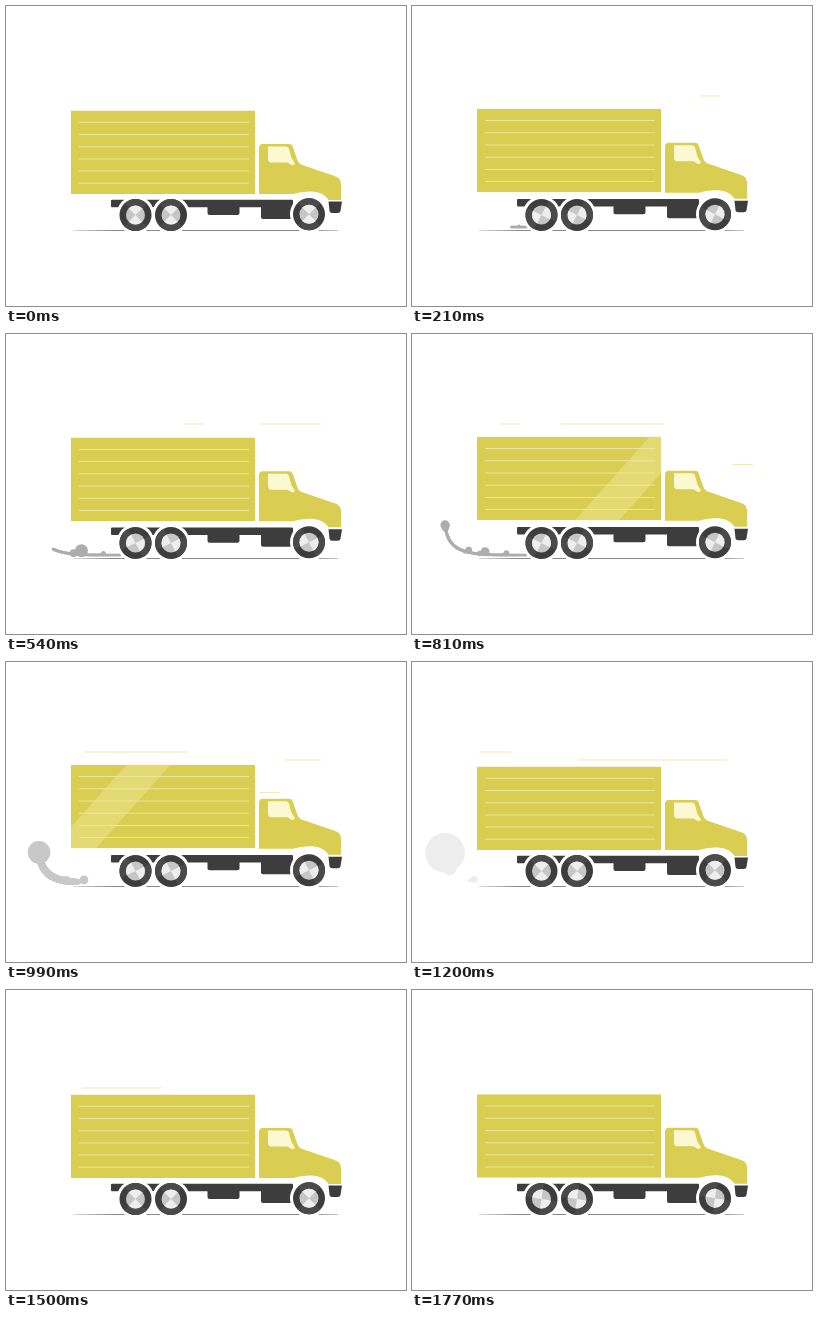
These frames come from a looping animation (400x300 px, 1800 ms). An HTML page with a canvas:

```html
<!DOCTYPE html>
<html lang="en">
<head>
<meta charset="utf-8">
<title>Truck</title>
<style>
  html, body { margin: 0; width: 100%; height: 100%; overflow: hidden; background: #fff; }
  canvas { display: block; width: 400px; height: 300px; }
</style>
</head>
<body>
<canvas id="stage"></canvas>
<script>
const LOOP = 1800, STEP = 30, BOUNCE = 300;
const YELLOW = '#d9cd52', PALE = '#ede69a', DARK = '#3d3d3d', SMOKE = '#adadad';
const canvas = document.getElementById('stage');
const scale = window.devicePixelRatio || 1;
canvas.width = 400 * scale;
canvas.height = 300 * scale;
const ctx = canvas.getContext('2d');

const cab = new Path2D('M253 188V142Q253 138 257 138H283Q286 138 286.5 140L291 153Q292 157 295 158.5L330 170.5Q335 172.5 335 178V194H322.5C319 188 312 185.5 303 185.5Q294 185.5 287 188Z');
const glass = new Path2D('M262 140.5H280Q282.5 140.5 283 143L285.5 152L289 157.5Q288 160 285.5 159L281.5 156.5H265Q262 156.5 262 152Z');
const bumper = new Path2D('M322.5 195.5H336L334.5 205Q334 207 332 207H326Q324 207 323.5 205Z');

const clamp = (v, lo = 0, hi = 1) => Math.min(hi, Math.max(lo, v));
const progress = (t, from, to) => clamp((t - from) / (to - from));

function fill(color, path) {
  ctx.fillStyle = color;
  ctx.fill(path);
}

function rect(color, x, y, w, h, r = 0) {
  const p = new Path2D();
  p.roundRect(x, y, w, h, r);
  fill(color, p);
}

function disc(color, x, y, r) {
  const p = new Path2D();
  p.arc(x, y, r, 0, Math.PI * 2);
  fill(color, p);
}

function hLine(x1, x2, y, color, width = 1) {
  if (x2 > x1) rect(color, x1, y - width / 2, x2 - x1, width);
}

function shifted(dy, paint) {
  ctx.save();
  ctx.translate(0, dy);
  paint();
  ctx.restore();
}

function streak(t, start, speed, length, y, left, right) {
  const x = right - (t - start) * speed;
  hLine(clamp(x, left, right), clamp(x + length, left, right), y, '#f0ebb4');
}

function streaks(t) {
  streak(t, 129, 0.333, 20, 90, 68, 315);
  streak(t, 385, 0.392, 104, 90, 68, 315);
  streak(t, 920, 0.532, 149, 98, 76, 315);
  streak(t, 740, 0.37, 21, 130.5, 249, 346);
}

// Smoke runs along the road and curls up: a cubic curve from exhaust to tip.
function trail(s) {
  const q = 1 - s;
  const bezier = (a, b, c, d) => a*q*q*q + 3*b*s*q*q + 3*c*s*s*q + d*s*s*s;
  return [bezier(114, 58, 36, 33), bezier(221, 221, 222, 190)];
}

function smoke(t) {
  const head = progress(t, 150, 810), tail = progress(t, 840, 1300);
  if (!head || tail === 1) return;
  const fade = 1 - progress(t, 840, 1200) * 0.78;
  const spread = 1 + tail * 4;
  ctx.save();
  ctx.beginPath();
  ctx.rect(0, 0, 400, 223);
  ctx.clip();
  const color = `rgb(${[0, 0, 0].map(() => Math.round(255 - 82 * fade))})`;
  for (let s = tail; s <= head; s += 0.01) {
    const [x, y] = trail(s);
    const flare = 3.5 * progress(s, 0.92, 1);
    disc(color, x, y, (1.6 + flare) * spread);
  }
  for (let i = 0; i < 3; i++) {
    const age = (t - 150 - i * 240) / 800;
    if (age <= 0 || age >= 1) continue;
    const [x, y] = trail(age * 0.56);
    const r = (i ? 4.5 : 6.5) * Math.sin(Math.PI * age);
    disc(color, x, y - r * 0.6, r);
    disc(color, x - r * 1.2, y - r * 0.2, r * 0.6);
  }
  ctx.restore();
}

function ground() {
  const g = ctx.createLinearGradient(66, 0, 333, 0);
  g.addColorStop(0, '#ddd');
  g.addColorStop(0.15, '#888');
  g.addColorStop(0.9, '#888');
  g.addColorStop(1, '#ccc');
  hLine(67, 332, 224.5, g);
}

function box(t) {
  ctx.beginPath();
  ctx.rect(65, 104.5, 184, 83.5);
  ctx.clip();
  rect(YELLOW, 65, 104.5, 184, 83.5);
  if (t > 660 && t < 1200) {
    const x = 163 - (t - 810) * 0.65;
    fill('#e4da74', new Path2D(`M${x} 188H${x + 44}L${x + 119} 104H${x + 75}Z`));
  }
  for (let i = 0; i < 6; i++) hLine(73, 243, 116.3 + i * 12.2, PALE);
}

function chassis() {
  rect(DARK, 105, 193.8, 182, 7.5, 1);
  rect(DARK, 201.5, 196, 32, 13, 2);
  rect(DARK, 255, 196, 32, 17, 2);
  fill(DARK, bumper);
}

function wedges(color, x, y, r, angle) {
  for (const turn of [0, Math.PI]) {
    const a = angle + turn - Math.PI / 2;
    const p = new Path2D();
    p.moveTo(x, y);
    p.arc(x, y, r, a - Math.PI / 4, a + Math.PI / 4);
    p.closePath();
    fill(color, p);
  }
}

function wheel(x, y, angle) {
  disc('#fff', x, y, 19);
  disc(DARK, x, y, 16);
  wedges('#4a4a4a', x, y, 16, angle);
  disc('#c6c6c6', x, y, 9.5);
  wedges('#eee', x, y, 9.5, angle);
}

function draw(t) {
  const turn = t / BOUNCE * Math.PI * 2;
  const lift = 1.3 * (Math.cos(turn) - 1);
  ctx.setTransform(scale, 0, 0, scale, 0, 0);
  rect('#fff', 0, 0, 400, 300);
  streaks(t);
  ground();
  smoke(t);
  shifted(lift * 0.4, chassis);
  for (const x of [129.5, 165]) wheel(x, 209, turn);
  wheel(303, 208.3, turn);
  shifted(lift, () => box(t));
  shifted(lift * 0.8, () => {
    fill(YELLOW, cab);
    fill('#fbf8d2', glass);
  });
}

const began = performance.now();
function tick() {
  const t = (performance.now() - began) % LOOP;
  draw(Math.floor(t / STEP) * STEP);
  requestAnimationFrame(tick);
}
tick();
</script>
</body>
</html>
```
